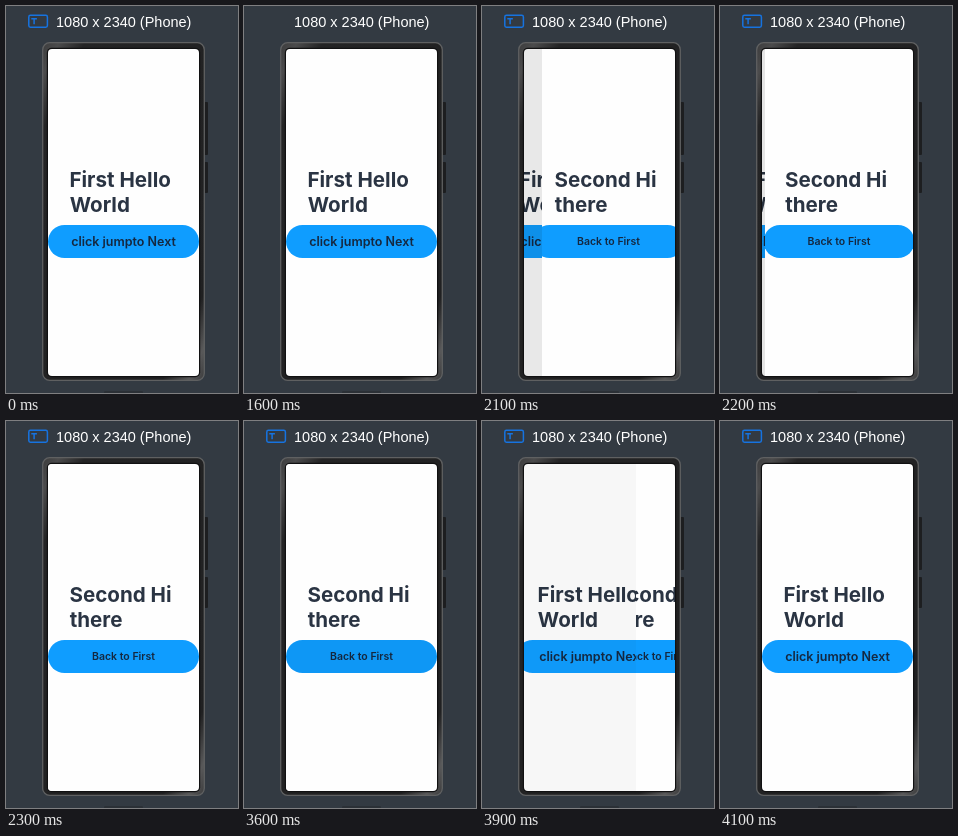
Recreate the animation shown at these times as an HTML page. Size 232x387 px, loop 5000 ms.

```html
<!DOCTYPE html>
<html lang="en">
<head>
<meta charset="utf-8">
<title>Page transition</title>
<style>
  html, body { margin: 0; width: 100%; height: 100%; overflow: hidden; background: #333a42; }
  svg { display: block; width: 232px; height: 387px; }
  .size { font: 14.5px "Liberation Sans", Arial, sans-serif; fill: #fff; }
  .title { font: 650 20.6px Inter, sans-serif; fill: #2a3443; }
  .label { font: 600 12.5px Inter, sans-serif; fill: #152840; text-anchor: middle; }
  .label.small { font-size: 10.5px; }
  .button { fill: #0f9dff; }
</style>
</head>
<body>
<svg viewBox="0 0 232 387">
  <defs>
    <linearGradient id="metal" x1="0" y1="0" x2="1" y2="1">
      <stop offset="0" stop-color="#3c3c3d"/>
      <stop offset=".05" stop-color="#4b4b4c"/>
      <stop offset=".13" stop-color="#242425"/>
      <stop offset=".87" stop-color="#202021"/>
      <stop offset=".95" stop-color="#585859"/>
      <stop offset="1" stop-color="#3c3c3d"/>
    </linearGradient>
    <clipPath id="screen"><rect x="42" y="43" width="151" height="327" rx="4"/></clipPath>
    <clipPath id="reveal"><rect id="window" x="42" y="43" width="151" height="327"/></clipPath>
  </defs>

  <g id="icon" fill="none" stroke="#1673e0" stroke-width="1.5">
    <rect x="22.8" y="9.3" width="18.6" height="11.9" rx="1.6"/>
    <path d="M25.3 12.8h5.6M28.1 12.8v5.4"/>
  </g>
  <text class="size" x="50" y="21">1080 x 2340 (Phone)</text>

  <path d="M198 96h3q1 0 1 1v51q0 1-1 1h-3zM198 156h3q1 0 1 1v29q0 1-1 1h-3z" fill="#1d1e20"/>
  <rect x="36.7" y="36.7" width="161.6" height="337.6" rx="7" fill="url(#metal)" stroke="#5f6061" stroke-width="1.3"/>
  <rect x="40.8" y="41.8" width="153.4" height="329.4" rx="5" fill="#111112"/>
  <path d="M98 387v-1q0-1 1-1h37q1 0 1 1v1z" fill="#2b3036"/>

  <g clip-path="url(#screen)">
    <g id="first">
      <rect x="42" y="43" width="151" height="327" fill="#fefefe"/>
      <text class="title" x="63.4" y="181">First Hello</text>
      <text class="title" x="63.7" y="205.5">World</text>
      <rect class="button" x="42" y="219" width="151" height="33" rx="16.5"/>
      <text class="label" x="117.5" y="240">click jumpto Next</text>
    </g>
    <rect id="shade" x="42" y="43" width="151" height="327"/>
    <g clip-path="url(#reveal)">
      <g id="second">
        <rect x="42" y="43" width="151" height="327" fill="#fefefe"/>
        <text class="title" x="63.4" y="181">Second Hi</text>
        <text class="title" x="63.7" y="205.5">there</text>
        <rect class="button" x="42" y="219" width="151" height="33" rx="16.5"/>
        <text class="label small" x="117.5" y="239.4">Back to First</text>
      </g>
    </g>
    <rect id="press" x="42" y="219" width="151" height="33" rx="16.5" fill="#000" fill-opacity=".04"/>
  </g>
</svg>
<script>
const LOOP = 5000, LEFT = 42, WIDTH = 151;
const $ = id => document.getElementById(id);
const [icon, first, second, shade, reveal, press] =
  ["icon", "first", "second", "shade", "window", "press"].map($);

// [start in ms, share of the second page shown]
const steps = [
  [0, 0], [1800, .185], [1900, .455], [2000, .69], [2100, .88], [2200, .977], [2300, 1],
  [3700, .8], [3800, .5], [3900, .26], [4000, .09], [4100, 0]
];

const within = (t, from) => t >= from && t < from + 100;
const show = (el, on) => el.setAttribute("visibility", on ? "visible" : "hidden");
const shift = (el, x) => el.setAttribute("transform", `translate(${x})`);

function draw(t) {
  const p = steps.filter(([at]) => at <= t).pop()[1];
  const gap = Math.round(WIDTH * (1 - p));
  shift(first, -.2 * WIDTH * p);
  shift(second, gap / 2);
  reveal.setAttribute("x", LEFT + gap);
  shade.setAttribute("fill-opacity", .1 * p);
  show(second, p > 0);
  show(icon, !within(t, 1600));
  show(press, within(t, 1700) || within(t, 3600));
}

const start = performance.now();
function tick() {
  draw((performance.now() - start) % LOOP);
  requestAnimationFrame(tick);
}
tick();
</script>
</body>
</html>
```
